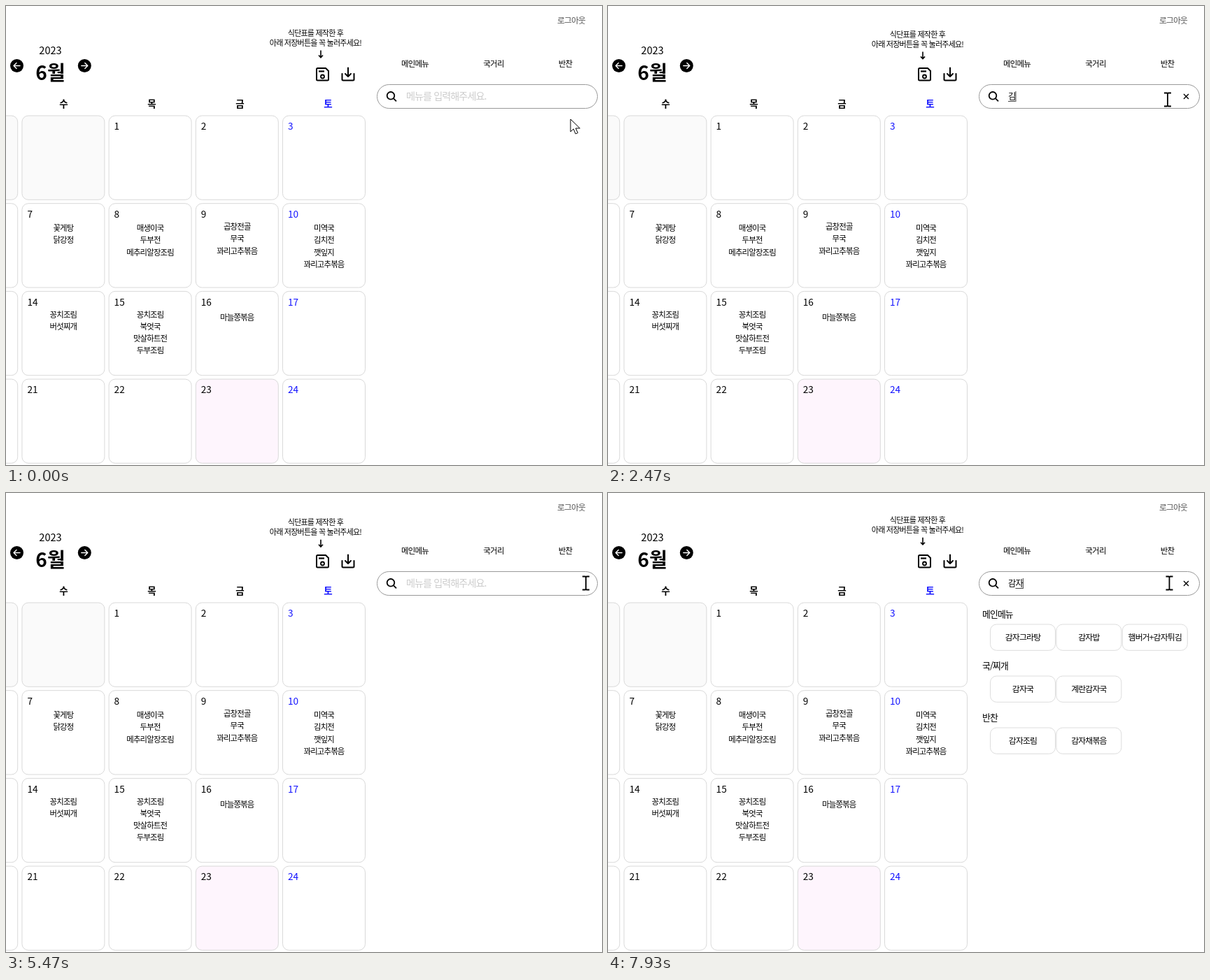
Recreate the animation shown at these times as an HTML page. Size 852 px wide and 657 px high, loop 8000 ms.

```html
<!DOCTYPE html>
<html lang="ko">
<head>
<meta charset="utf-8">
<style>
  html, body { margin: 0; width: 100%; height: 100%; overflow: hidden; background: #fff; }
  svg { display: block; width: 852px; height: 657px; }
  text { font-family: "Noto Sans CJK KR", "Noto Sans CJK", "Noto Sans CJK JP", sans-serif; white-space: pre; }
</style>
</head>
<body>
<svg id="stage" viewBox="0 0 852 657"></svg>
<script>
const LOOP = 8000, BLUE = '#1414ff';
const stage = document.getElementById('stage');

function label(x, y, text, size, { fill = '#000', weight = 400, anchor = 'middle' } = {}) {
  const spacing = /\d/.test(text) ? 0 : -0.07 * size;
  return `<text x="${x}" y="${y + 0.37 * size}" font-size="${size}" font-weight="${weight}" fill="${fill}"
    text-anchor="${anchor}" letter-spacing="${spacing}">${text}</text>`;
}
const box = (x, y, w, h, r, stroke, fill = '#fff') =>
  `<rect x="${x}" y="${y}" width="${w}" height="${h}" rx="${r}" fill="${fill}" stroke="${stroke}"/>`;
const line = (d, width = 2, color = '#000', more = '') =>
  `<path d="${d}" fill="none" stroke="${color}" stroke-width="${width}" ${more}/>`;
const round = 'stroke-linecap="round" stroke-linejoin="round"';

// Calendar
const meals = {
  7: [318, '꽃게탕', '닭강정'],
  8: [318, '매생이국', '두부전', '메추리알장조림'],
  9: [316, '곱창전골', '무국', '꽈리고추볶음'],
  10: [318, '미역국', '김치전', '깻잎지', '꽈리고추볶음'],
  14: [441.5, '꽁치조림', '버섯찌개'],
  15: [441.5, '꽁치조림', '북엇국', '맛살하트전', '두부조림'],
  16: [445.5, '마늘쫑볶음']
};

function calendar() {
  let out = '';
  for (let row = 0; row < 4; row++) {
    for (let col = 0; col < 5; col++) {
      const x = -101.3 + 124.2 * col, y = 157 + 125.7 * row;
      const day = row * 7 + col - 1;
      const fill = day < 1 ? '#fafafa' : day === 23 ? '#fef5fd' : '#fff';
      out += box(x, y, 118, 120.3, 9, '#d9d9d9', fill);
      if (day < 1 || col === 0) continue;
      out += label(x + 7.5, y + 15.3, String(day), 13.6, { anchor: 'start', fill: col === 4 ? BLUE : '#000' });
      const [top, ...names] = meals[day] || [];
      names.forEach((name, i) => out += label(x + 59, top + 17.2 * i, name, 11.4));
    }
  }
  [...'수목금토'].forEach((d, i) =>
    out += label(82 + 126 * i, 140, d, 13.5, { weight: 700, fill: d === '토' ? BLUE : '#000' }));
  return out;
}

const roundArrow = (x, dir) => `<circle cx="${x}" cy="85.5" r="9.5"/>` +
  line(`M${x - 4.5 * dir} 85.5h${9 * dir}m${-4 * dir} -4l${4 * dir} 4l${-4 * dir} 4`, 1.4, '#fff', round);

const icons =
  line('M444 90.5q0-1.500 1.500-1.500h11.500l4 4v12q0 1.500-1.500 1.500h-14q-1.500 0-1.500-1.500z', 2, '#000', round) +
  line('M447 93.500h8', 2.2) + '<circle cx="452.500" cy="101" r="2.500" fill="none" stroke="#000" stroke-width="1.800"/>' +
  line('M480.500 97v8q0 1.500 1.500 1.500h14q1.500 0 1.500-1.500v-8M489 88.500v12.500m-4-4l4 4l4-4', 2, '#000', round);

const cross = line('M823 126l7 7m0-7l-7 7', 1.4);

stage.innerHTML = calendar() + icons + roundArrow(15.5, -1) + roundArrow(112.3, 1) +
  label(63.5, 63.5, '2023', 14.6) +
  label(63.5, 95.5, '6월', 28, { weight: 900 }) +
  label(808, 21, '로그아웃', 11.8, { fill: '#555' }) +
  label(584.5, 83, '메인메뉴', 11.5, { weight: 500 }) +
  label(697, 83, '국거리', 11.5, { weight: 500 }) +
  label(799.5, 83, '반찬', 11.5, { weight: 500 }) +
  box(530.5, 112.5, 315, 34, 17, '#999') +
  '<circle cx="550" cy="128.300" r="5.300" fill="none" stroke="#000" stroke-width="1.800"/>' +
  line('M554 132.300l4 4', 1.8) +
  `<g id="notice">${label(442.5, 39, '식단표를 제작한 후', 11)}${label(442.5, 52.7, '아래 저장버튼을 꼭 눌러주세요!', 11)}
    ${line('M450 63.500v10m-3-3l3 3.200l3-3.200', 1.6)}</g>
  <g id="field"></g><g id="results"></g><g id="pointer"></g>`;

const [notice, field, results, pointer] =
  ['notice', 'field', 'results', 'pointer'].map(id => document.getElementById(id));

// Typing: null means the field has no focus
const typing = [
  [0, null], [1150, ''], [2070, 'ㄱ'], [2230, '기'], [2400, '김'], [2770, '김ㅊ'], [2900, '김치'],
  [5390, null], [6150, ''], [6850, 'ㄱ'], [7030, '가'], [7200, '감'], [7480, '감ㅈ'], [7600, '감자']
];

const kimchi = [
  ['김치등갈비찜', '김치볶음밥', '김치알밥'],
  ['김치찌개', '김치콩나물국'],
  ['김치전', '물김치', '배추김치', '볶음김치', '열무김치', '파김치']
];
const potato = [
  ['감자그라탕', '감자밥', '햄버거+감자튀김'],
  ['감자국', '계란감자국'],
  ['감자조림', '감자채볶음']
];
const lists = [
  [0, []],
  [2600, [kimchi[0], kimchi[1], [...kimchi[2], '김구이', '김무침']]],
  [3070, kimchi], [5390, []], [7400, potato]
];

// Pointer: time, x, y
const path = [
  [0, 807, 162], [350, 807, 162], [900, 800, 136], [1300, 801, 137], [1900, 800, 134],
  [4000, 800, 134], [4400, 820, 140], [4700, 828, 133], [5200, 826, 129], [5330, 826, 129],
  [5450, 829, 129], [5650, 829, 129], [6130, 802.5, 129], [8000, 802.5, 129]
];
const shapes = {
  arrow: '<path d="M0 0v18l4.200-4l3 7l3.200-1.400l-3-6.600h6z" fill="#fff" stroke="#000"/>',
  beam: line('M-5 -9.500h4l1 1l1-1h4M-5 9.500h4l1-1l1 1h4M0-9v18', 1.8),
  hand: `<path d="M-1.500 12V1.500q0-1.500 1.500-1.500t1.500 1.500v6q3-1 3.500 1q3-.7 3.200 1q2.500-.3 2.500 2v5q0 2-2 5h-8q-3-5-6-9q0-2 2-2z"
    fill="#fff" stroke="#000"/>`
};

const latest = (list, t) => list.filter(e => e[0] <= t).pop();

function drawField(t) {
  const [since, text] = latest(typing, t);
  if (!text) {
    return label(572, 129, '메뉴를 입력해주세요.', 14.2, { anchor: 'start', fill: '#ccc', weight: 500 }) +
      (text === '' && (t - since) % 1000 < 500 ? line('M572.500 122v15', 1) : '');
  }
  const step = 10.45, end = 572 + step * text.length;
  return label(572, 129.5, text, 12.3, { anchor: 'start' }) + cross +
    line(`M${end - step} 136.500h${step}`, 1, '#444') +
    ((t - since) % 1000 < 500 ? line(`M${end + 0.5} 122v15`, 1, '#444') : '');
}

function drawResults(groups) {
  let y = 173.5, out = '';
  groups.forEach((names, g) => {
    out += label(535, y, ['메인메뉴', '국/찌개', '반찬'][g], 12.9, { anchor: 'start', weight: 500 });
    names.forEach((name, i) => {
      const x = 546.5 + 94.4 * (i % 3), top = y + 14.5 + 43 * Math.floor(i / 3);
      out += box(x, top, 93, 37.3, 9, '#ddd') + label(x + 46.5, top + 18.8, name, 11.9);
    });
    y += 31 + 43 * Math.ceil(names.length / 3);
  });
  return out;
}

function drawPointer(t) {
  const i = path.findIndex(p => p[0] > t);
  const [t0, x0, y0] = path[i - 1], [t1, x1, y1] = path[i];
  const u = (t - t0) / (t1 - t0), k = u * u * (3 - 2 * u);
  const x = x0 + (x1 - x0) * k, y = y0 + (y1 - y0) * k;
  const shape = y > 147 ? 'arrow' : t > 4500 && t < 5390 && x > 821 ? 'hand' : 'beam';
  return `<g transform="translate(${x} ${y})">${shapes[shape]}</g>`;
}

const cache = new Map();
function put(node, html) {
  if (cache.get(node) !== html) {
    node.innerHTML = html;
    cache.set(node, html);
  }
}

function frame() {
  const t = performance.now() % LOOP;
  const drop = 2.6 * (1 - Math.cos(Math.PI * (t - 60) / 1000));
  notice.setAttribute('transform', `translate(0 ${drop})`);
  put(field, drawField(t));
  put(results, drawResults(latest(lists, t)[1]));
  put(pointer, drawPointer(t));
  requestAnimationFrame(frame);
}
frame();
</script>
</body>
</html>
```
